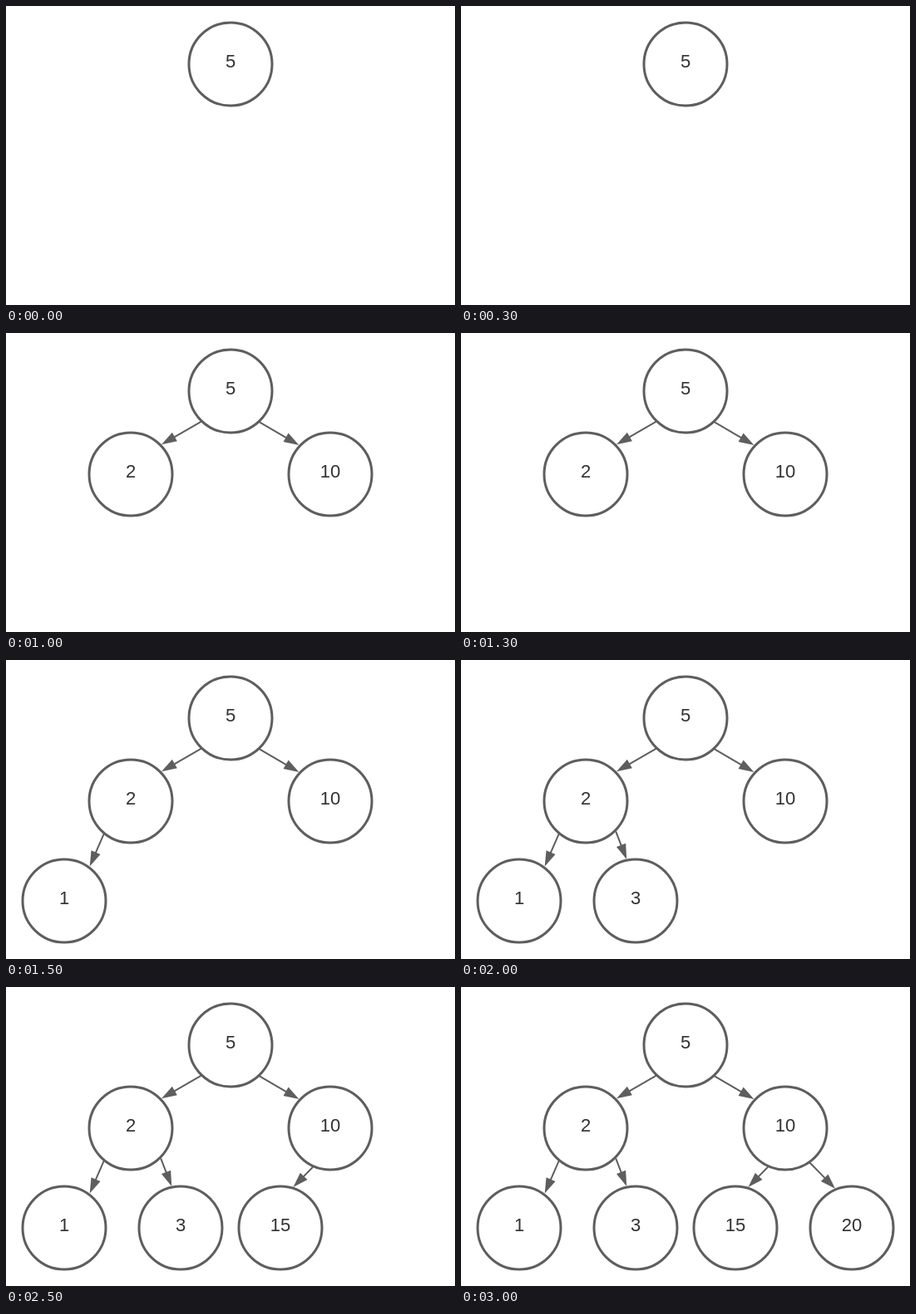
These frames come from a looping animation (540 px wide and 360 px high, 3500 ms). An HTML page:

```html
<!DOCTYPE html>
<html lang="en">
<head>
<meta charset="utf-8">
<title>Binary tree growth</title>
<style>
  html, body { margin: 0; width: 100%; height: 100%; overflow: hidden; background: #fff; }
  svg { display: block; width: 100%; height: 100%; }
  circle { fill: #fff; stroke: #5e5e5e; stroke-width: 3; }
  line { stroke: #5e5e5e; stroke-width: 2; }
  polygon { fill: #5e5e5e; }
  text { font: 22px "Liberation Sans", Arial, sans-serif; fill: #333; text-anchor: middle; }
</style>
</head>
<body>
<svg id="stage" viewBox="0 0 540 360"></svg>
<script>
const STEP = 500, RADIUS = 50, HEAD = 18.3, HALF = 6;

// Nodes in order of insertion; edge is [startX, startY, tipX, tipY].
const nodes = [
  { label: 5, x: 270, y: 70 },
  { label: 10, x: 390, y: 170, edge: [304.6, 107.2, 352.4, 135] },
  { label: 2, x: 150, y: 170, edge: [234.8, 106.7, 187, 134.2] },
  { label: 1, x: 70, y: 290, edge: [117.7, 209.4, 100.7, 248.4] },
  { label: 3, x: 210, y: 290, edge: [186.2, 206.4, 199.2, 239.9] },
  { label: 15, x: 330, y: 290, edge: [369, 216.8, 345.4, 241] },
  { label: 20, x: 470, y: 290, edge: [419.3, 211.3, 450, 242.8] }
];

const stage = document.getElementById("stage");

function add(parent, tag, attrs = {}) {
  const el = document.createElementNS("http://www.w3.org/2000/svg", tag);
  for (const key in attrs) el.setAttribute(key, attrs[key]);
  return parent.appendChild(el);
}

function addArrow(parent, [x1, y1, x2, y2]) {
  const len = Math.hypot(x2 - x1, y2 - y1);
  const ux = (x2 - x1) / len, uy = (y2 - y1) / len;
  const bx = x2 - ux * HEAD, by = y2 - uy * HEAD;
  const left = [bx - uy * HALF, by + ux * HALF];
  const right = [bx + uy * HALF, by - ux * HALF];
  add(parent, "line", { x1, y1, x2: bx + ux, y2: by + uy });
  add(parent, "polygon", { points: [x2, y2, ...left, ...right].join(" ") });
}

const groups = nodes.map(({ label, x, y, edge }) => {
  const group = add(stage, "g");
  add(group, "circle", { cx: x, cy: y, r: RADIUS });
  if (edge) addArrow(group, edge);
  add(group, "text", { x, y: y + 4 }).textContent = label;
  return group;
});

function render(time) {
  const current = Math.floor(time / STEP) % nodes.length;
  groups.forEach((group, i) => {
    group.style.display = i <= current ? "" : "none";
  });
}

const start = performance.now();
function tick() {
  render(performance.now() - start);
  requestAnimationFrame(tick);
}
tick();
</script>
</body>
</html>
```
